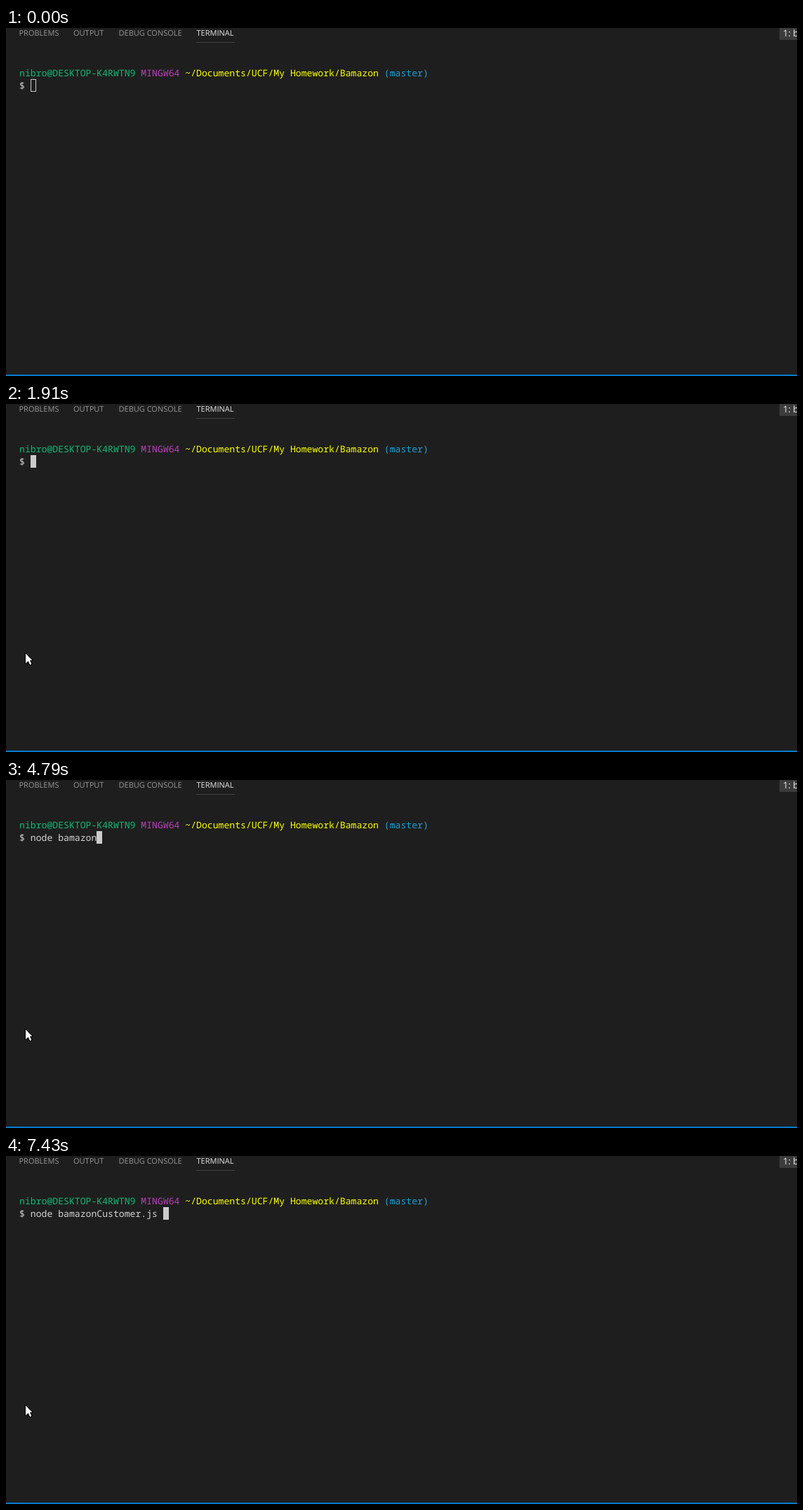
Animation, 1127 px wide and 497 px high, one loop 8 s. Source, as an HTML page:

```html
<!DOCTYPE html>
<html lang="en">
<head>
<meta charset="utf-8">
<title>Terminal</title>
<style>
  html, body { margin: 0; width: 100%; height: 100%; overflow: hidden; background: #1e1e1e; }
  svg { display: block; width: 1127px; height: 497px; }
  text { text-rendering: geometricPrecision; }
  .tabs { font: 500 11px "Open Sans", "Noto Sans", sans-serif; fill: #979797; }
  .tabs .on { fill: #e7e7e7; }
  .pick { font: 500 13px "Open Sans", "Noto Sans", sans-serif; fill: #f0f0f0; }
  .shell { font: 500 13.14px "Noto Sans Mono", "DejaVu Sans Mono", monospace; fill: #d4d4d4; }
  .user { fill: #0dbc79; }
  .system { fill: #bc3fbc; }
  .path { fill: #ff0; }
  .branch { fill: #1ba3d8; }
  #caret { fill: none; stroke: #ccc; }
  #caret.focus { fill: #ccc; }
  #mouse { fill: #fff; stroke: #000; stroke-width: 2; stroke-linejoin: round; paint-order: stroke; }
</style>
</head>
<body>
<svg viewBox="0 0 1127 497">
  <rect width="1127" height="497" fill="#1e1e1e"/>
  <g class="tabs">
    <text x="18.5" y="10.5">PROBLEMS</text>
    <text x="96" y="10.5">OUTPUT</text>
    <text x="160.5" y="10.5">DEBUG CONSOLE</text>
    <text x="271.5" y="10.5" class="on">TERMINAL</text>
  </g>
  <rect x="271" y="20" width="55" height="1" fill="#404040"/>
  <rect x="1102" width="25" height="17" fill="#3c3c3c"/>
  <text class="pick" x="1107" y="12">1: bash</text>
  <g class="shell">
    <text x="19.1" y="69">
      <tspan class="user">nibro@DESKTOP-K4RWTN9</tspan>
      <tspan class="system">MINGW64</tspan>
      <tspan class="path">~/Documents/UCF/My Homework/Bamazon</tspan>
      <tspan class="branch">(master)</tspan>
    </text>
    <text id="line" x="19.1" y="87">$</text>
  </g>
  <rect id="caret" y="73.5" width="7" height="17"/>
  <rect y="495" width="1127" height="2" fill="#007acc"/>
  <path id="mouse" d="M1 1.4L10.4 11H7L9 15.5V17H7L4.6 12L1 15.4Z"/>
</svg>
<script>
  const LOOP = 8000, CELL = 7.884, LEFT = 19.1, FOCUS = 1120;
  const command = 'node bamazonCustomer.js ';

  // [time, characters typed]
  const typing = [
    [0, 0], [2450, 1], [2520, 2], [2690, 3], [2930, 4], [3080, 5], [3860, 6],
    [4790, 12], [5560, 13], [6800, 14], [7030, 15], [7430, command.length]
  ];

  // Pointer moves along quadratic curves, in a few visible steps each.
  // The first one enters the stage, so its opening step shows the start point.
  const moves = [
    { start: 210, end: 350, steps: 3, skip: 0, from: [967, 479], via: [380, 240], to: [102, 147] },
    { start: 670, end: 1045, steps: 6, skip: 1, from: [102, 147], via: [80, 111], to: [66, 85] },
    { start: 1450, end: 1910, steps: 7, skip: 1, from: [66, 85], via: [-5, 260], to: [27, 355] }
  ];

  const line = document.getElementById('line');
  const caret = document.getElementById('caret');
  const mouse = document.getElementById('mouse');

  function pointerAt(t) {
    const move = moves.filter(m => t >= m.start).pop();
    if (!move) return null;
    const { start, end, steps, skip, from, via, to } = move;
    const last = steps - 1;
    const step = Math.min(last, Math.floor((t - start) / (end - start) * last + 1e-6));
    const u = (step + skip) / (last + skip);
    const v = 1 - u;
    return from.map((p, i) => Math.round(v * v * p + 2 * u * v * via[i] + u * u * to[i]));
  }

  function draw(t) {
    const count = typing.filter(([time]) => t >= time).pop()[1];
    line.textContent = '$ ' + command.slice(0, count);
    caret.setAttribute('x', Math.round(LEFT + (count + 2) * CELL) + 0.5);
    caret.classList.toggle('focus', t >= FOCUS);

    const spot = pointerAt(t);
    mouse.style.display = spot ? '' : 'none';
    if (spot) mouse.setAttribute('transform', `translate(${spot})`);
  }

  const begin = performance.now();
  function tick() {
    draw((performance.now() - begin) % LOOP);
    requestAnimationFrame(tick);
  }
  tick();
</script>
</body>
</html>
```
